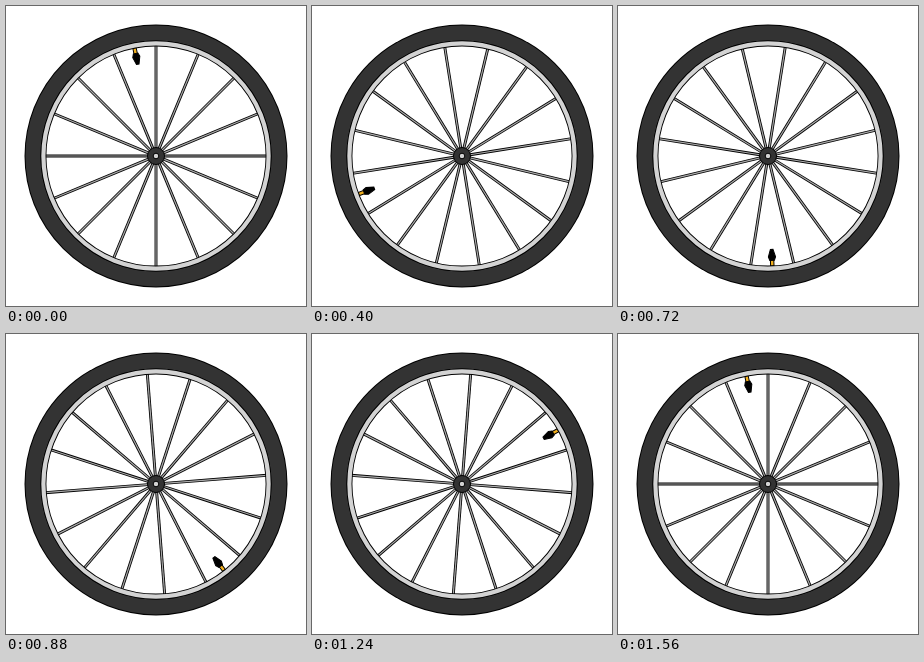
An HTML page for the animation above (1600 ms loop, 300 by 300 pixels).

```html
<!DOCTYPE html>
<html lang="en">
<head>
<meta charset="utf-8">
<title>Turning wheel</title>
<style>
  html, body { margin: 0; height: 100%; overflow: hidden; background: #fff; }
  svg { display: block; width: 100vw; height: 100vh; }
</style>
</head>
<body>
<svg viewBox="-150 -150 300 300">
  <g id="wheel">
    <g id="spokes"></g>
    <g id="valve" transform="rotate(-11.25)" stroke="#000">
      <path d="M-1.7-110V-102H1.7V-110Z" fill="#f2b01e"/>
      <path d="M-2.3-104.5H2.3L3.6-101L1.3-93.5H-1.3L-3.6-101Z"/>
    </g>
  </g>
  <g fill="none" stroke="#000">
    <circle r="123" stroke-width="17"/>
    <circle r="123" stroke="#333" stroke-width="15"/>
    <circle r="112.6" stroke-width="6"/>
    <circle r="112.6" stroke="#d3d3d3" stroke-width="4.2"/>
    <circle r="8.5" fill="#333"/>
    <circle r="2.8" fill="#d3d3d3"/>
  </g>
</svg>
<script>
  const FRAME = 40, LOOP = 1600, SPOKES = 16;
  const wheel = document.getElementById('wheel');
  const spokes = document.getElementById('spokes');

  for (let i = 0; i < SPOKES; i++) {
    const turn = `transform="rotate(${i * 360 / SPOKES})"`;
    spokes.innerHTML += `<g ${turn}><path d="M0-5V-111" stroke="#000" stroke-width="2.9"/>
      <path d="M0-5V-111" stroke="#aaa" stroke-width="1.2"/></g>`;
  }

  // Slightly faster for the first ten steps, then steady.
  const angleAt = step => step < 10 ? step * 9.9 : 9 + step * 9;

  function draw(now) {
    const step = Math.floor(now % LOOP / FRAME);
    wheel.setAttribute('transform', `rotate(${-angleAt(step)})`);
    requestAnimationFrame(() => draw(performance.now()));
  }
  draw(performance.now());
</script>
</body>
</html>
```
